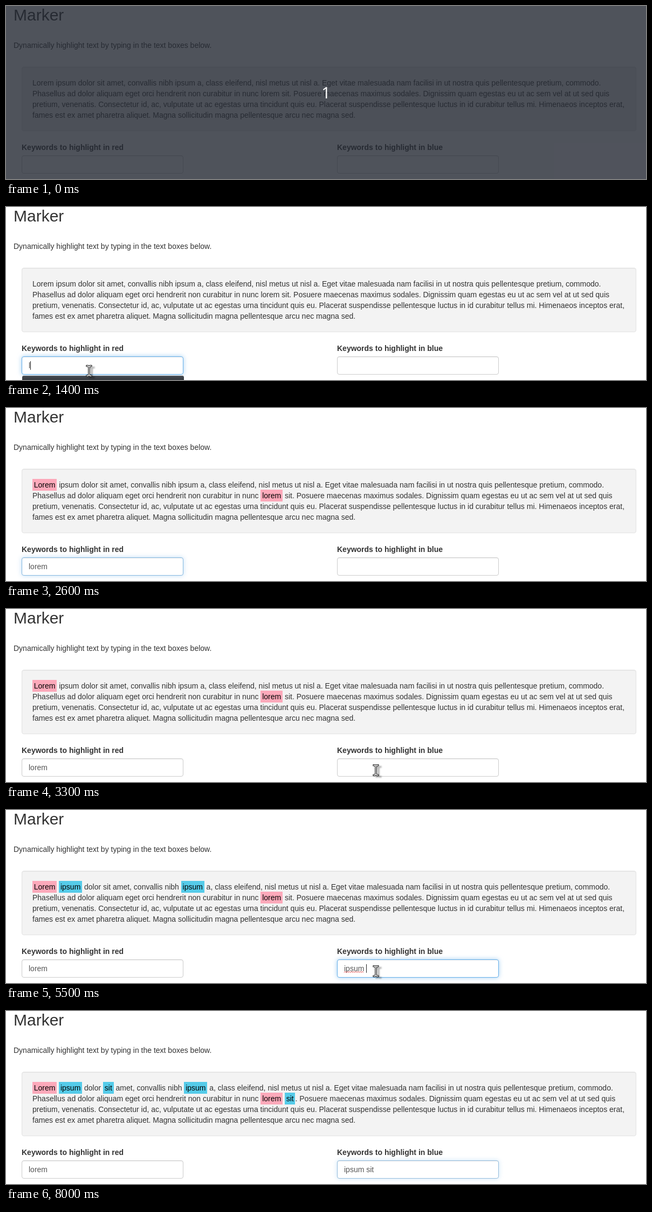
An HTML page that plays this animation: 1187 px wide and 322 px high, repeating every 8.1 s.

```html
<!DOCTYPE html>
<html lang="en">
<head>
<meta charset="utf-8">
<title>Marker</title>
<style>
  html, body { margin: 0; width: 100%; height: 100%; overflow: hidden; background: #fff; }
  body { position: relative; font: 14px/20px "Liberation Sans", Arial, sans-serif; color: #333; }
  body > * { position: absolute; margin: 0; box-sizing: border-box; white-space: pre; }
  h2 { left: 14px; top: 0; font-size: 30px; font-weight: 400; line-height: 33px; }
  #intro { left: 14px; top: 63px; }
  #well {
    left: 29px; top: 113px; width: 1140px; height: 120px; padding: 19px;
    background: #f3f3f3; border: 1px solid #e3e3e3; border-radius: 4px;
    box-shadow: inset 0 1px 1px rgba(0, 0, 0, .05);
  }
  mark { background: none; color: inherit; }
  mark.on { padding: .2em; color: #000; background: #55cbe9; }
  mark.lorem.on { background: #fca9ba; }
  label { top: 253px; font-weight: 700; }
  .field {
    --focus: 0;
    top: 278px; width: 300px; height: 34px; padding: 6px 12px; color: #555; background: #fff;
    border: 1px solid color-mix(in srgb, #66afe9 calc(var(--focus) * 100%), #ccc); border-radius: 4px;
    box-shadow: inset 0 1px 1px rgba(0, 0, 0, .075), 0 0 8px rgba(102, 175, 233, calc(var(--focus) * .6));
  }
  .field span { display: inline-block; position: relative; height: 20px; vertical-align: top; }
  .caret span::after {
    content: ""; position: absolute; left: 100%; top: 2px; width: 1px; height: 16px; background: #222;
  }
  .left { left: 29px; }
  .right { left: 614px; }
  #menu {
    left: 30px; top: 314px; width: 300px; height: 20px; border-radius: 3px 3px 0 0;
    background: linear-gradient(#50545a, #3b3f45 4px);
  }
  svg { left: 0; top: 0; width: 1187px; height: 322px; overflow: hidden; }
  #pointer { filter: drop-shadow(5px 3px 1px rgba(0, 0, 0, .28)); }
  #pointer path { fill: #fff; stroke: #222; stroke-width: 1.2; stroke-linejoin: round; }
  #squiggle { fill: none; stroke: #e03030; stroke-width: .9; }
  #countdown {
    left: 0; top: 0; width: 1187px; height: 322px; text-align: center;
    background: rgba(36, 40, 51, .8); color: #fff; font: 29px/322px "Open Sans", "Noto Sans", sans-serif;
  }
</style>
</head>
<body>
<h2>Marker</h2>
<p id="intro">Dynamically highlight text by typing in the text boxes below.</p>
<div id="well">Lorem ipsum dolor sit amet, convallis nibh ipsum a, class eleifend, nisl metus ut nisl a. Eget vitae malesuada nam facilisi in ut nostra quis pellentesque pretium, commodo.
Phasellus ad dolor aliquam eget orci hendrerit non curabitur in nunc lorem sit. Posuere maecenas maximus sodales. Dignissim quam egestas eu ut ac sem vel at ut sed quis
pretium, venenatis. Consectetur id, ac, vulputate ut ac egestas urna tincidunt quis eu. Placerat suspendisse pellentesque luctus in id curabitur tellus mi. Himenaeos inceptos erat,
fames est ex amet pharetra aliquet. Magna sollicitudin magna pellentesque arcu nec magna sed.</div>
<label class="left">Keywords to highlight in red</label>
<label class="right">Keywords to highlight in blue</label>
<div class="field left" id="red"><span></span></div>
<div class="field right" id="blue"><span></span></div>
<div id="menu"></div>
<svg>
  <path id="squiggle"/>
  <g id="pointer">
    <path id="beam" d="M-5 -10.5H-2L0 -9.5L2 -10.5H5V-8H2.5L1.3 -7V7L2.5 8H5V10.5H2L0 9.5L-2 10.5H-5V8H-2.5L-1.3 7V-7L-2.5 -8H-5Z"/>
    <path id="arrow" d="M0 0V17L4 13.4L7 20.3L10 19L7.1 12.4H12.2Z"/>
  </g>
</svg>
<div id="countdown">1</div>
<script>
const LOOP = 8100;
const $ = id => document.getElementById(id);

// Each table lists [start in ms, value...]; a value holds until the next row.
const pointer = [
  [0], [400, 'arrow', 190, 310], [500, 'beam', 166, 308], [600, 'beam', 154, 305],
  [2200, 'arrow', 154, 305], [2400],
  [3100, 'arrow', 655, 309], [3200, 'beam', 672, 305], [3300, 'beam', 686, 300],
  [6600, 'arrow', 685.5, 300.5], [6700],
  [7000, 'arrow', 100, 254], [7100, 'beam', 83, 185], [7300, 'arrow', 66, 125],
  [7400, 'arrow', 50, 56], [7500, 'beam', 37, 15], [7600],
];
const fields = {
  red: {
    text: [[0, ''], [1400, 'l'], [1500, 'lo'], [1600, 'lor'], [1700, 'lore'], [1900, 'lorem']],
    focus: [[0, 0], [700, .3], [800, .7], [900, .9], [1000, 1], [2600, .7], [2700, .2], [2900, 0]],
    caret: [[0, 0], [800, 1], [2400, 0]],
  },
  blue: {
    text: [[0, ''], [4600, 'ip'], [4800, 'ips'], [4900, 'ipsu'], [5100, 'ipsum'], [5400, 'ipsum '],
      [5800, 'ipsum s'], [5900, 'ipsum si'], [6100, 'ipsum sit']],
    focus: [[0, 0], [3600, .3], [3700, .7], [3800, .9], [3900, 1], [7900, .85], [8000, .55]],
    caret: [[0, 0], [3600, 1], [4300, 0], [4600, 1], [6700, 0], [7300, 1], [7700, 0]],
  },
};
const highlightAt = { lorem: 2300, ipsum: 5500, sit: 6600 };

const rowAt = (table, t) => table.findLast(row => row[0] <= t);
const valueAt = (table, t) => rowAt(table, t)[1];
const show = (el, on) => { el.style.display = on ? '' : 'none'; };
const between = (t, from, to) => t >= from && t < to;

$('well').innerHTML = $('well').textContent.replace(/\b(lorem|ipsum|sit)\b/gi,
  word => `<mark class="${word.toLowerCase()}">${word}</mark>`);
const marks = [...document.querySelectorAll('mark')].map(el => ({ el, start: highlightAt[el.className] }));

$('squiggle').setAttribute('d', 'M' + Array.from({ length: 19 },
  (_, i) => `${627 + i * 2} ${i % 2 ? 300.6 : 302.6}`).join('L'));

function drawField(id, { text, focus, caret }, t) {
  const el = $(id), label = el.firstChild, value = valueAt(text, t);
  if (label.textContent !== value) label.textContent = value;
  el.style.setProperty('--focus', valueAt(focus, t));
  el.classList.toggle('caret', !!valueAt(caret, t));
}

function drawPointer(t) {
  const [, shape, x = 0, y = 0] = rowAt(pointer, t);
  for (const id of ['beam', 'arrow']) show($(id), id === shape);
  $('pointer').setAttribute('transform', `translate(${x} ${y})`);
}

function draw(now) {
  const t = now % LOOP;
  for (const id in fields) drawField(id, fields[id], t);
  for (const { el, start } of marks) el.classList.toggle('on', t >= start);
  drawPointer(t);
  show($('countdown'), t < 100);
  show($('menu'), between(t, 1400, 1600));
  show($('squiggle'), between(t, 5400, 7700));
}

const start = performance.now();
function tick() {
  draw(performance.now() - start);
  requestAnimationFrame(tick);
}
tick();
</script>
</body>
</html>
```
